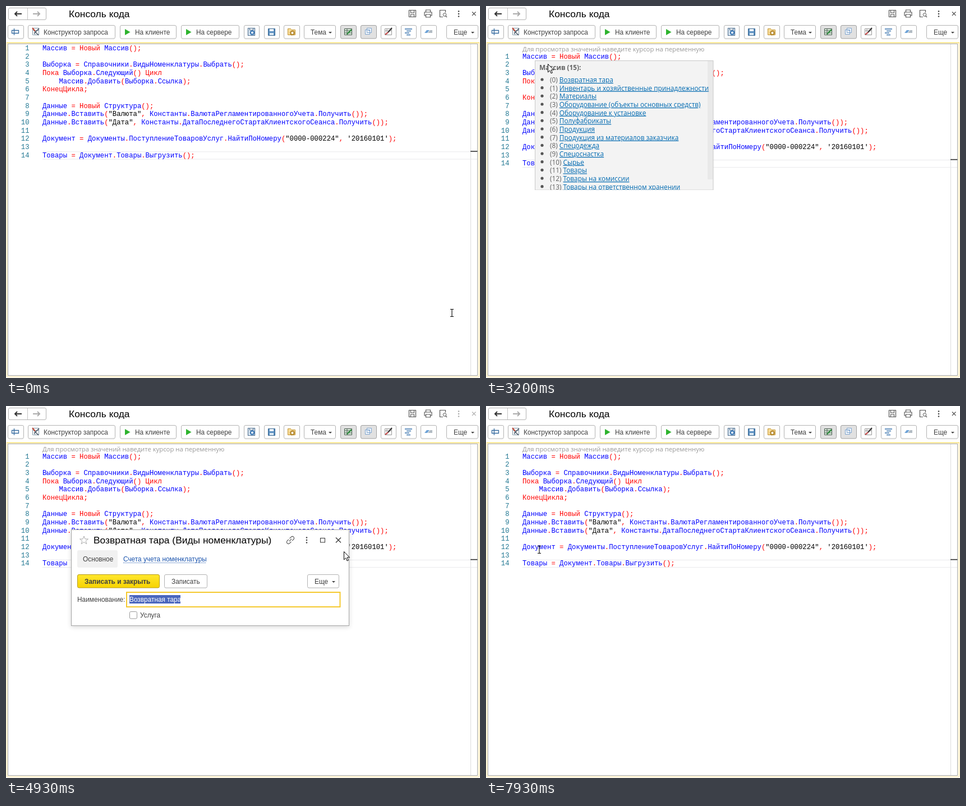
These frames come from a looping animation (845 by 663 pixels, 8000 ms). An HTML page:

```html
<!DOCTYPE html>
<html lang="ru">
<head>
<meta charset="utf-8">
<title>Консоль кода</title>
<style>
html, body { margin: 0; width: 100%; height: 100%; overflow: hidden; background: #fff; }
svg { display: block; width: 845px; height: 663px; }
text { white-space: pre; font: 11.85px "Liberation Sans", Arial, sans-serif; fill: #404040; }
.title { font-size: 17.4px; fill: #000; }
.bold { font-weight: bold; }
.code { font: 12.24px "Liberation Mono", "Courier New", monospace; fill: #00f; }
.num { fill: #237893; text-anchor: end; }
.k { fill: #f00; }
.s { fill: #000; }
.hint { font: 11.3px "Open Sans", "Noto Sans", sans-serif; fill: #999; }
.pop { font: 11.8px "Open Sans", "Noto Sans", sans-serif; fill: #616161; }
.pop.bold { font-weight: bold; }
.link { fill: #006ab1; text-decoration: underline; }
.tip { font: 10.5px "Open Sans", "Noto Sans", sans-serif; fill: #575757; }
</style>
</head>
<body>
<svg id="stage" viewBox="0 0 845 663">
  <defs>
    <clipPath id="popClip"><rect x="87" y="97" width="319" height="231"/></clipPath>
    <linearGradient id="gold" x2="0" y2="1"><stop stop-color="#ffe72e"/><stop offset="1" stop-color="#f7d300"/></linearGradient>
    <filter id="soft" x="-10%" y="-20%" width="120%" height="140%"><feGaussianBlur stdDeviation="4"/></filter>
  </defs>
  <g id="bar"></g>
  <g id="editor"></g>
  <g id="popup"></g>
  <g id="tooltip"></g>
  <g id="dialog"></g>
  <g id="pointer"></g>
</svg>
<script>
const $ = id => document.getElementById(id);

function add(parent, tag, attrs = {}, text) {
  const node = document.createElementNS('http://www.w3.org/2000/svg', tag);
  for (const key in attrs) node.setAttribute(key, attrs[key]);
  if (text !== undefined) node.textContent = text;
  return parent.appendChild(node);
}
const rect = (p, x, y, width, height, fill, stroke = 'none', rx = 0) =>
  add(p, 'rect', { x, y, width, height, fill, stroke, rx });
const path = (p, d, stroke, width = 1, fill = 'none') =>
  add(p, 'path', { d, stroke, 'stroke-width': width, fill });
const label = (p, x, y, text, cls = '') => add(p, 'text', { x, y, class: cls }, text);
const group = (p, x = 0, y = 0) => add(p, 'g', { transform: `translate(${x} ${y})` });
const dots = (p, x, y, r = 1.3) =>
  [-4.5, 0, 4.5].forEach(d => add(p, 'circle', { cx: x, cy: y + d, r, fill: '#444' }));
const arrowDown = (p, x, y) => path(p, `M${x - 3} ${y}h6l-3 3z`, 'none', 0, '#444');

function button(p, x, right, text, textX, pressed, y = 34.5) {
  const box = rect(p, x + .5, y, right - x, 23.5, pressed ? '#e1e1e1' : '#fff', pressed ? '#a0a0a0' : '#b3b3b3', 2.5);
  if (!pressed) path(p, `M${x + 2} ${y + 24.3}H${right - 1}`, '#ddd');
  if (text) label(p, textX, y + 16, text);
  return box;
}

// Toolbar and title
const bar = $('bar');
rect(bar, 0, 0, 845, 663, '#fff');
rect(bar, 4.5, 3.5, 67, 21, '#fff', '#b3b3b3', 2.5);
path(bar, 'M38.5 4V24', '#c4c4c4');
path(bar, 'M28 14H16M20 10l-4 4 4 4', '#333', 2);
path(bar, 'M48 14H60M56 10l4 4-4 4', '#aaa', 2);
label(bar, 112, 20, 'Консоль кода', 'title');

path(bar, 'M718.5 7.5h12v12h-12zM721.5 8v4h6v-4M721.5 19v-4h6v4', '#555', 1.2);
path(bar, 'M748.5 11v-4h8v4M748.5 17h-2.5v-6h13v6h-2.5M748.5 15h8v5h-8z', '#555', 1.2);
path(bar, 'M779 19.5h-5.500v-12h10v4M786 20l-2.500-2.500', '#555', 1.2);
add(bar, 'circle', { cx: 782, cy: 15.5, r: 2.8, fill: 'none', stroke: '#555' });
const winIcons = group(bar);
dots(winIcons, 807, 14);
path(winIcons, 'M831 10.5l6.500 6.500M837.5 10.5l-6.500 6.500', '#555', 1.2);

const buttons = [[3, 31], [39, 194, 'Конструктор запроса', 67], [203, 303, 'На клиенте', 230],
  [424, 451], [460, 487], [495, 523], [531, 587, 'Тема', 543], [596, 624, '', 0, true],
  [632, 660, '', 0, true], [668, 695], [704, 731], [739, 767], [785, 841, 'Еще', 798]];
buttons.forEach(b => button(bar, ...b));
const run = button(bar, 312, 415, 'На сервере', 339);
[212, 321].forEach(x => path(bar, `M${x} 41l9.500 5.500-9.500 5.500z`, 'none', 0, '#2db32d'));
arrowDown(bar, 578, 46);
arrowDown(bar, 832, 46);

path(bar, 'M10.5 43.5h12v5h-12zM14.5 40v12', '#356a9f', 1.3);
path(bar, 'M47.5 39.5h11v12h-11zM47.5 43.500h11M51.5 43v8', '#8297a8');
path(bar, 'M47 39l5 6', '#c64a36', 2);
path(bar, 'M51 45l7 7M59 40l-9 9', '#4a5866', 1.6);
function gear(x, y, color) {
  add(bar, 'circle', { cx: x, cy: y, r: 3, fill: '#fff', stroke: color, 'stroke-width': 2 });
  add(bar, 'circle', { cx: x, cy: y, r: 4.4, fill: 'none', stroke: color, 'stroke-dasharray': '1.700 1.750' });
}
path(bar, 'M431.5 39.5h12v13h-12zM434.5 40v3h6v-3', '#4e6f90', 1.2, '#e3edf6');
gear(439, 47.5, '#3d78b4');
path(bar, 'M467.5 40.5h12v12h-12z', '#35648f', 1, '#5b8fc0');
rect(bar, 470, 41, 7, 4, '#fff');
rect(bar, 470, 48, 7, 4, '#dce9f4');
path(bar, 'M502.5 51.5v-11h5l2 2h6v9z', '#c29434', 1, '#f7dc98');
gear(510.5, 48, '#b58a32');
path(bar, 'M603.5 40.5h13v11h-13zM603.5 44h13M603.5 48h13M608 40.500v11', '#4b5d52', 1, '#dcebdc');
path(bar, 'M608 50l8-8', '#2c8b3c', 2.4);
path(bar, 'M640.5 42.5h8v8h-8zM643.5 39.5h8v8h-8zM646 43.500h3', '#7fa3cc', 1, '#f1f6fb');
path(bar, 'M675.5 40.5h12v11h-12zM675.5 44h12M679 40.500v11', '#999');
path(bar, 'M676 51l5-4', '#c44', 2);
path(bar, 'M681 47l7-8', '#333', 2);
path(bar, 'M711 41h13M714 44.500h8M711 48h8M714 51.500h7', '#3470ad', 1.7);
path(bar, 'M746 48l4-5h5l-4 5z', 'none', 0, '#6da2d6');
path(bar, 'M752 48l4-5h4v5z', 'none', 0, '#b3bcc4');

// Code editor
const LINE = 14.67;
const source = `Массив = Новый Массив();

Выборка = Справочники.ВидыНоменклатуры.Выбрать();
Пока Выборка.Следующий() Цикл
    Массив.Добавить(Выборка.Ссылка);
КонецЦикла;

Данные = Новый Структура();
Данные.Вставить("Валюта", Константы.ВалютаРегламентированногоУчета.Получить());
Данные.Вставить("Дата", Константы.ДатаПоследнегоСтартаКлиентскогоСеанса.Получить());

Документ = Документы.ПоступлениеТоваровУслуг.НайтиПоНомеру("0000-000224", '20160101');

Товары = Документ.Товары.Выгрузить();`;
const keywords = ['Новый', 'Пока', 'Цикл', 'КонецЦикла'];
const tokenClass = t => /^["']/.test(t) ? 's' : /^[А-Яа-я]/.test(t) && !keywords.includes(t) ? '' : 'k';

const editor = $('editor');
rect(editor, 1.5, 65.5, 842, 595.5, '#fffcee', '#f8e2a0', 1);
path(editor, 'M1 65.5H844', '#fbd33c');
rect(editor, 3.5, 67.5, 837, 591, '#fff', '#a6a6a6');
path(editor, 'M828.5 68V658', '#dedede');
const hint = label(editor, 65, 81, 'Для просмотра значений наведите курсор на переменную', 'hint');
const code = group(editor);
path(code, 'M65 259.800H840M65 273H840', '#e9e9ec');
path(code, 'M828 259H840.500', '#333', 1.6);
source.split('\n').forEach((line, i) => {
  const y = 79 + LINE * i;
  label(code, 41.5, y, i + 1, 'code num');
  const row = label(code, 65, y, '', 'code');
  for (const t of line.match(/"[^"]*"|'[^']*'|[А-Яа-я]+|[^А-Яа-я"']+/g) || [])
    add(row, 'tspan', { class: tokenClass(t) }, t);
});
const caret = rect(code, 336, 259.5, 2, 14, '#000');

// Value popup
const popup = $('popup');
popup.setAttribute('clip-path', 'url(#popClip)');
rect(popup, 87.5, 97.5, 317.5, 230.5, '#f3f3f3', '#c8c8c8');
label(popup, 95, 114, 'Массив (15):', 'pop bold');
['Возвратная тара', 'Инвентарь и хозяйственные принадлежности', 'Материалы',
  'Оборудование (объекты основных средств)', 'Оборудование к установке', 'Полуфабрикаты',
  'Продукция', 'Продукция из материалов заказчика', 'Спецодежда', 'Спецоснастка', 'Сырье',
  'Товары', 'Товары на комиссии', 'Товары на ответственном хранении'].forEach((name, i) => {
  const y = 136 + LINE * i;
  add(popup, 'circle', { cx: 100, cy: y - 5, r: 2.6, fill: '#555' });
  const row = label(popup, 114, y, `(${i}) `, 'pop');
  add(row, 'tspan', { class: 'link' }, name);
});
const scroll = rect(popup, 395, 98, 10, 211, '#bababa');

const tooltip = $('tooltip');
rect(tooltip, 135, 152, 238, 43, '#000').setAttribute('opacity', .35);
rect(tooltip, 132.5, 148.5, 238, 44, '#fff', '#767676');
['k4rel/base/', 'Классификатор.ТипыУпаковки?ref=4170526', '2bf48eec0137d9ba6fe51ac8b4']
  .forEach((text, i) => label(tooltip, 138, 160 + 13.8 * i, text, 'tip'));

// Item dialog
const dialog = $('dialog');
const shade = rect(dialog, 116, 223, 496, 171, '#000');
shade.setAttribute('filter', 'url(#soft)');
shade.setAttribute('opacity', .15);
rect(dialog, 116.5, 220.5, 495, 171, '#fff', '#a4a4a4');
path(dialog, 'M139 232l2 5h5.500l-4.300 3.500 1.600 5.300-4.800-3.200-4.800 3.200 1.600-5.300-4.300-3.500h5.500z', '#aaa');
label(dialog, 156, 245, 'Возвратная тара (Виды номенклатуры)', 'title');
const chain = add(dialog, 'g', { transform: 'translate(507 239) rotate(-45)' });
path(chain, 'M-1 3h-4a3 3 0 0 1 0-6h3.500M1-3h4a3 3 0 0 1 0 6h-3.500M-3 0h6', '#555', 1.2);
dots(dialog, 536, 239);
rect(dialog, 560.5, 235.5, 8, 7.5, 'none', '#333');
path(dialog, 'M588 234.500l9 9M597 234.500l-9 9', '#333', 1.2);
rect(dialog, 127, 257, 72, 31, '#f1f1f1', 'none', 3);
label(dialog, 137, 277, 'Основное');
label(dialog, 209, 277, 'Счета учета номенклатуры').setAttribute('style', 'fill:#1c55ae');
path(dialog, 'M209 279.500H357', '#1c55ae').setAttribute('stroke-dasharray', '1 1');
rect(dialog, 127.5, 300.5, 146, 23.5, 'url(#gold)', '#b79c16', 2.5);
label(dialog, 140, 317, 'Записать и закрыть', 'bold');
button(dialog, 282, 358, 'Записать', 295, false, 300.5);
button(dialog, 537, 593, 'Еще', 550, false, 300.5);
arrowDown(dialog, 584, 312);
label(dialog, 127, 349, 'Наименование:');
rect(dialog, 215, 332, 380.5, 26, '#fff', '#f5c92f').setAttribute('stroke-width', 2);
const selection = rect(dialog, 220, 337, 91, 15, '#4a66bd');
const field = label(dialog, 220, 349, 'Возвратная тара');
rect(dialog, 220.5, 366.5, 13, 12.5, '#fff', '#999', 2);
label(dialog, 239, 377, 'Услуга');

// Pointer shapes, each drawn around its hot spot
const pointer = $('pointer');
const shapes = { arrow: group(pointer), beam: group(pointer), hand: group(pointer) };
path(shapes.arrow, 'M.5 .5V15l3.300-3.200 2.300 5.200 2.300-1-2.300-5.100h4.500z', '#000', 1, '#fff');
path(shapes.beam, 'M-3 -6.500H3M0-6.500V6.500M-3 6.500H3', '#000', 1.1);
path(shapes.hand, 'M0 0c1.500 0 2 1 2 2v5l5 1.200c1.700.4 2 1.300 2 3 0 4-1.500 5-1.500 8.800h-8c0-2.500-5-6.500-5-9 0-1.500 2-1.500 3.500.7V2c0-1 .5-2 2-2zM4.500 8v3M7 9v2.500', '#000', 1, '#fff');

// time, x, y, shape from then on
const track = [
  [0, 795, 547, 'beam'], [30, 795, 547, 'beam'], [440, 389, 72, 'arrow'], [530, 378, 48, 'arrow'],
  [1290, 378, 48, 'arrow'], [1400, 368, 69, 'beam'], [1690, 368, 69, 'beam'], [2270, 95, 88, 'beam'],
  [3030, 95, 88, 'beam'], [3200, 110, 103, 'arrow'], [3430, 150, 130, 'hand'], [4070, 150, 130, 'arrow'],
  [4420, 150, 130, 'arrow'], [4930, 602, 259, 'arrow'], [5030, 602, 259, 'arrow'], [5270, 592, 238, 'arrow'],
  [5420, 592, 238, 'arrow'], [5580, 390, 195, 'beam'], [5670, 230, 181, 'beam'], [6060, 62, 187, 'arrow'],
  [6200, 50, 189, 'arrow'], [6240, 50, 189, 'arrow'], [6320, 75, 155, 'beam'], [6400, 84, 139, 'beam'],
  [6570, 84, 139, 'beam'], [6730, 84, 134, 'beam'], [7630, 84, 134, 'beam'], [7930, 95, 256, 'beam'],
  [8000, 95, 256, 'beam']];

const within = (t, a, b) => t >= a && t < b;
const ramp = (t, a, b) => Math.min(1, Math.max(0, (t - a) / (b - a)));
const show = (node, alpha) => {
  node.style.display = alpha > 0 ? '' : 'none';
  node.setAttribute('opacity', +alpha);
};

function movePointer(t) {
  const i = track.findIndex((k, n) => n + 1 < track.length && t < track[n + 1][0]);
  const [t0, x0, y0, shape] = track[i], [t1, x1, y1] = track[i + 1];
  const p = ramp(t, t0, t1), e = p * p * (3 - 2 * p);
  pointer.setAttribute('transform', `translate(${Math.round(x0 + (x1 - x0) * e)} ${Math.round(y0 + (y1 - y0) * e)})`);
  for (const name in shapes) show(shapes[name], name === shape);
}

function draw(t) {
  const shifted = t >= 1130;
  code.setAttribute('transform', `translate(0 ${shifted ? LINE : 0})`);
  show(hint, shifted);
  show(caret, within(t, 7130, 7670));

  run.setAttribute('stroke', within(t, 500, 1370) ? '#777' : '#b3b3b3');
  run.setAttribute('fill', within(t, 730, 870) ? '#e1e1e1' : '#fff');

  show(popup, within(t, 2520, 4000) ? ramp(t, 2520, 2660) : 0);
  show(scroll, ramp(t, 3180, 3300));
  show(tooltip, within(t, 3660, 3960) ? ramp(t, 3660, 3790) : 0);

  const open = ramp(t, 4000, 4200), close = ramp(t, 5480, 5685);
  const size = 1 - .05 * (1 - open) - .048 * close;
  dialog.setAttribute('transform', `translate(364 306) scale(${size}) translate(-364 -306)`);
  show(dialog, open * (1 - close));
  const selected = t >= 4470;
  show(selection, selected);
  field.style.fill = selected ? '#fff' : '#404040';
  show(winIcons, within(t, 4000, 5480) ? .45 : 1);

  movePointer(t);
}

function tick() {
  draw(performance.now() % 8000);
  requestAnimationFrame(tick);
}
tick();
</script>
</body>
</html>
```
